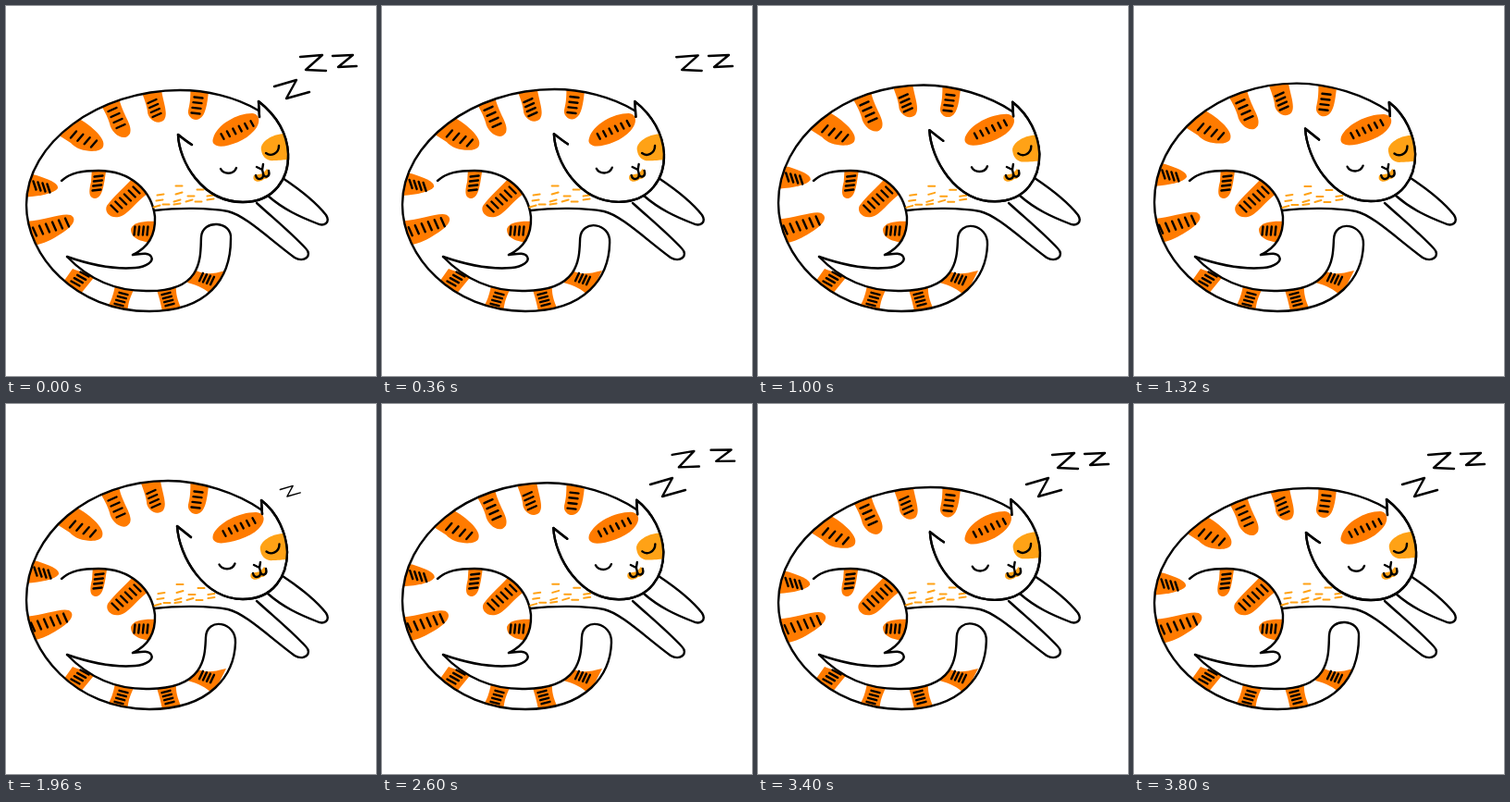
These frames come from a looping animation (400 px wide and 400 px high, 3.84 s). An HTML page:

```html
<!DOCTYPE html>
<html lang="en">
<head>
<meta charset="utf-8">
<title>Sleeping cat</title>
<style>
  html, body { margin: 0; width: 100%; height: 100%; overflow: hidden; background: #fff; }
  svg { display: block; width: 100vw; height: 100vh; }
  .ink { fill: none; stroke: #000; stroke-width: 2.4; stroke-linecap: round; stroke-linejoin: round; }
  .white { fill: #fff; }
  .fur { fill: #ff7b00; }
  .light { fill: #ffa216; }
  .hair { fill: none; stroke: #ffa216; stroke-width: 2; stroke-linecap: round; }
</style>
</head>
<body>
<svg viewBox="0 0 400 400">
  <defs>
    <clipPath id="bodyClip"><path id="bodyShape"/></clipPath>
    <clipPath id="thighClip"><path id="thighShape"/></clipPath>
    <clipPath id="headClip"><path id="headShape"/></clipPath>
  </defs>
  <g id="coat" clip-path="url(#bodyClip)"></g>
  <g id="thigh" clip-path="url(#thighClip)"></g>
  <g id="lines"></g>
  <g id="head"></g>
  <g id="patch" clip-path="url(#headClip)"></g>
  <g id="face"></g>
  <g id="sleep"></g>
</svg>
<script>
const LOOP = 3840;
const $ = id => document.getElementById(id);
const clamp = v => Math.min(1, Math.max(0, v));
const ease = v => (1 - Math.cos(Math.PI * clamp(v))) / 2;

function add(parent, d, cls) {
  const el = document.createElementNS('http://www.w3.org/2000/svg', 'path');
  el.setAttribute('d', d);
  el.setAttribute('class', cls);
  $(parent).appendChild(el);
  return el;
}

// Blend two paths that share the same commands.
function mix(a, b, k) {
  const to = b.match(/-?[\d.]+/g);
  let i = 0;
  return a.replace(/-?[\d.]+/g, n => (+n + (to[i++] - n) * k).toFixed(2));
}

// A row of n short strokes from one point to another.
function strokes([x1, y1, x2, y2, n, hx, hy]) {
  let d = '';
  for (let i = 0; i < n; i++) {
    const k = i / (n - 1), x = x1 + (x2 - x1) * k, y = y1 + (y2 - y1) * k;
    d += `M${x - hx} ${y - hy}L${x + hx} ${y + hy}`;
  }
  return d;
}

const drifting = [];
function drift(el, dx, dy) {
  drifting.push({ el, dx, dy });
}

function stripe(parent, d, marks, dx = 0, dy = 0) {
  drift(add(parent, d, 'fur'), dx, dy);
  drift(add(parent, strokes(marks), 'ink'), dx, dy);
}

// Back and flank
stripe('coat', 'M48 134L72 118C90 127 109 143 105 152C102 160 78 158 70 148Z', [73, 139, 95, 149, 4, 3, -3.5], -1, -9);
stripe('coat', 'M98 100L121 92C123 115 138 128 134 138C128 148 114 138 112 127C109 118 107 114 98 100Z', [115, 112, 124, 130, 4, 4.5, -2], 0, -9.5);
stripe('coat', 'M145 88L167 84C169 103 176 115 171 123C164 130 153 122 153 114C152 106 149 100 145 88Z', [158, 103, 163, 118, 4, 4.5, -2], -1, -8);
stripe('coat', 'M199 78L220 82C218 102 217 118 209 122C203 125 196 120 197 113C199 105 200 98 199 78Z', [208, 99, 205, 116, 4, 4.5, .5], 0, -4);
stripe('coat', 'M18 180L33 183C45 187 57 191 56 197C52 203 35 206 16 207Z', [31, 194, 46, 197, 4, 1.5, 4.5], 1, -13);
stripe('coat', 'M16 233C40 233 60 223 70 226C80 232 66 243 55 249C45 255 38 258 16 262Z', [31, 244, 66, 234, 6, 2, 4.5], -2, -3);

// Tail
stripe('coat', 'M60 301L72 284C80 288 88 288 98 290L80 312Z', [85, 290, 75, 300, 4, 4.5, 2.5]);
stripe('coat', 'M118 302L138 307C134 316 132 320 131 334L107 329C114 320 116 312 118 302Z', [127, 311, 122, 323, 4, 4.5, 1.2]);
stripe('coat', 'M162 304L184 300C183 312 186 320 192 332L170 336C168 324 166 316 162 304Z', [173, 311, 177, 323, 4, 4.5, -1.2]);
stripe('coat', 'M204 285C214 291 222 290 238 286L224 314C216 306 208 302 196 299Z', [211, 293, 223, 297, 4, -2, 4.2]);

// Thigh
stripe('thigh', 'M93 174L109 174C106 188 106 206 97 208C88 208 90 198 92 190Z', [100, 184, 98, 199, 4, 4.5, -.5], 1, 0);
stripe('thigh', 'M109 216C116 206 128 196 137 186L154 202C140 212 132 226 122 228C112 230 106 222 109 216Z', [117, 219, 141, 199, 6, 3.5, 3.5], 1, 0);
stripe('thigh', 'M167 233C150 232 138 233 135 241C135 252 145 255 167 257Z', [139, 243, 153, 243, 4, .5, -4.5]);

const THIGH = 'M137 269C152 262 162 250 161 228C158 200 135 178 100 178C82 178 70 180 60 189';
$('thighShape').setAttribute('d', THIGH + 'L66 271Z');

const BACK = [
  'M273 113C248 98 216 91 188 91C100 91 22 148 22 215C22 270 75 330 155 330',
  'M277 115C250 96 210 83 175 83C90 83 22 140 22 212C22 268 75 330 155 330'
];
const TAIL = [
  'C222 330 247 292 248 258C249 235 217 230 216 252C215 272 216 307 155 308C118 309 90 296 66 271',
  'C218 330 243 295 243 252C245 232 212 230 211 250C210 270 214 308 155 308C118 309 90 296 66 271'
];
const HEAD = [
  'M201 150C196 147 191 143 186 139C187 168 212 212 256 212C291 212 306 185 305 160C304 138 292 118 273 103L274 120',
  'M200 144C195 140 190 136 185 132C187 165 214 211 256 211C290 211 304 185 304 160C303 140 294 118 276 104L277 119'
];

const outline = add('lines', BACK[0], 'ink');
add('lines', THIGH, 'ink');
add('lines', 'M66 271C92 280 118 285 140 283C152 282 160 276 157 271C154 266 146 268 137 269', 'ink');
add('lines', 'M299 186C320 200 335 212 346 226C351 234 344 239 336 235C318 228 300 220 283 205', 'ink');
add('lines', 'M161 221C185 218 220 218 240 222C258 226 285 252 312 272C322 278 332 270 324 262C308 245 292 232 271 213', 'ink');

const hairs = [[187, 195], [167, 204], [187, 202], [210, 199], [166, 210], [185, 210], [200, 206],
  [221, 205], [163, 216], [173, 215], [185, 214], [198, 210], [208, 212], [221, 209]];
drift(add('lines', hairs.map(([x, y], i) => `M${x - 3.5} ${y + i % 3 - .5}L${x + 3.5} ${y - .5}`).join(''), 'hair'), 1, .5);

// Head
const skull = add('head', HEAD[0], 'ink');
skull.style.fill = '#fff';

const BROW = [
  'M224 143C228 128 250 116 266 116C276 117 275 128 268 135C258 147 235 154 228 151C223 149 223 146 224 143Z',
  'M224 141C230 128 252 117 270 117C281 118 281 127 273 135C262 146 236 152 229 150C223 148 223 145 224 141Z'
];
const brow = add('face', BROW[0], 'fur');
drift(add('face', strokes([234, 141, 266, 127, 6, 1.5, 2.8]), 'ink'), 2, -1);
drift(add('patch', 'M300 138C286 139 274 148 276 156C277 163 282 168 290 167C298 167 302 166 306 166L312 138Z', 'light'), -1, 2);
const rim = add('face', HEAD[0], 'ink');

drift(add('face', 'M232 176C235 182 246 183 249 175', 'ink'), -1.5, -2.5);
drift(add('face', 'M281 159C286 163 295 160 295 151', 'ink'), .5, .5);
drift(add('face', 'M268 183C265 190 274 192 279 187C286 187 286 179 282 176L278 181Z', 'light'), -3, 0);
drift(add('face', 'M271 174L277 177L278 171M277 177L278 181C279 187 286 185 284 178M278 181C279 188 271 189 270 183', 'ink'), -3, 0);

// Sleep letters: shape, centre, and the offset that settles after each pop
const letters = [
  ['M290 87L314 80L303 100L328 93', 309, 90, 0, 0, 0],
  ['M318 55L342 53L324 69L346 70', 332, 61, -3, -1, -5],
  ['M353 54L375 53L359 66L379 65', 366, 60, 2, -4, 2]
].map(([d, x, y, dx, dy, turn], i) => ({ el: add('sleep', d, 'ink'), x, y, dx, dy, turn, i }));

function popScale(t, i) {
  if (t < 1200) {
    const k = clamp((t - 160 - 180 * i) / 160);
    return 1 - k * k;
  }
  const k = clamp((t - 1900 - 150 * i) / 400) - 1;
  return Math.max(0, 1 + 2.7 * k ** 3 + 1.7 * k * k);
}

function draw(t) {
  const breath = t < 1760 ? ease(t / 1600) : 1 - ease((t - 1920) / 1920);
  const sway = t < 1900 ? 1 - ease(t / 620) : ease((t - 3200) / 620);
  const ear = Math.sin(Math.PI * clamp((t - 2920) / 240));

  const body = mix(BACK[0], BACK[1], breath) + mix(TAIL[0], TAIL[1], sway);
  outline.setAttribute('d', body);
  $('bodyShape').setAttribute('d', body + 'Z');

  // The ear flick moves only the first few points of the head.
  const twitch = [-4, 1, -6, 0, -9, 3, -7, 8];
  let n = 0;
  const skullPath = mix(HEAD[0], HEAD[1], breath)
    .replace(/-?[\d.]+/g, v => +v + (twitch[n++] || 0) * ear);
  for (const el of [skull, rim, $('headShape')]) el.setAttribute('d', skullPath);

  brow.setAttribute('d', mix(BROW[0], BROW[1], breath));
  for (const { el, dx, dy } of drifting) {
    el.setAttribute('transform', `translate(${dx * breath} ${dy * breath})`);
  }

  const settle = t < 1200 ? 0 : 1 - ease((t - 2600) / 480);
  for (const { el, x, y, dx, dy, turn, i } of letters) {
    const s = popScale(t, i), ox = x - 4, oy = y + 10;
    el.style.display = s > .01 ? '' : 'none';
    el.setAttribute('transform',
      `translate(${ox + dx * settle} ${oy + dy * settle}) rotate(${turn * settle}) scale(${s}) translate(${-ox} ${-oy})`);
  }
}

const start = performance.now();
function tick() {
  draw((performance.now() - start) % LOOP);
  requestAnimationFrame(tick);
}
tick();
</script>
</body>
</html>
```
